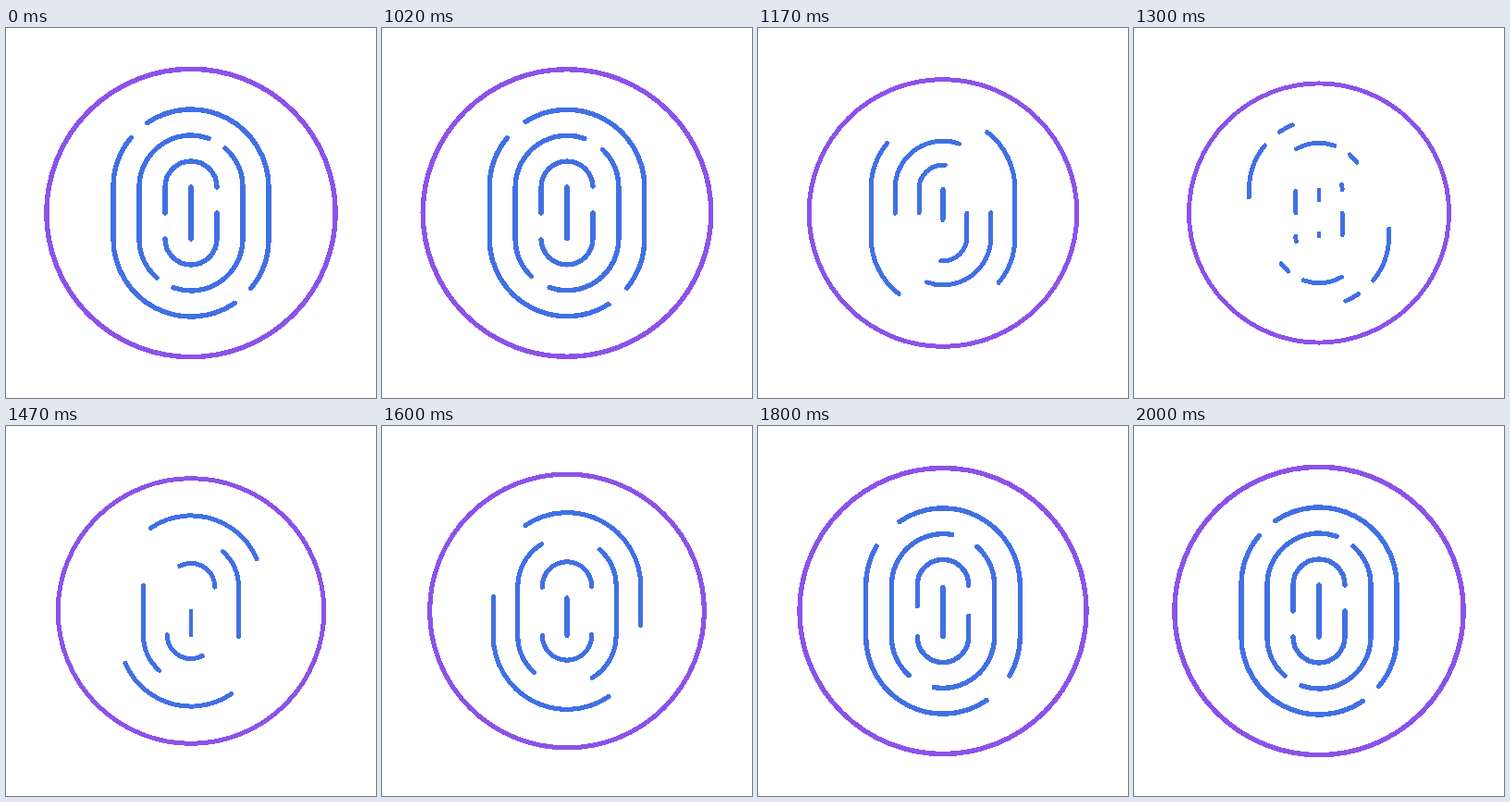
Write an HTML page that moves like this. It is 400 px wide and 400 px high and loops after 2.02 s.

```html
<!DOCTYPE html>
<html lang="en">
<head>
<meta charset="utf-8">
<title>Fingerprint</title>
<style>
  html, body { margin: 0; width: 100%; height: 100%; overflow: hidden; background: #fff; }
  svg { display: block; width: 100%; height: 100%; }
</style>
</head>
<body>
<svg viewBox="0 0 400 400" fill="none" stroke-width="5.4" stroke-linecap="round" shape-rendering="crispEdges">
  <g id="icon">
    <ellipse cx="200" cy="200" rx="156.2" ry="155.7" stroke="#8c52e8"/>
    <g id="ridges" stroke="#4170e4"/>
  </g>
</svg>
<script>
const LOOP = 2020, START = 1000, SPAN = 1000;
const TOP = 172, BOTTOM = 228;
const icon = document.getElementById('icon');
const ridges = document.getElementById('ridges');

// Point on a circle centred on the vertical axis, angle in degrees.
function polar(cy, r, angle) {
  const a = angle * Math.PI / 180;
  return `${200 + r * Math.cos(a)} ${cy + r * Math.sin(a)}`;
}

// Left side of a capsule, from its upper arc down to its lower arc.
function leftRidge(r, from, to) {
  const arc = `A${r} ${r} 0 0 0 `;
  return `M${polar(TOP, r, from)} ${arc}${200 - r} ${TOP} V${BOTTOM} ${arc}${polar(BOTTOM, r, to)}`;
}

function addPath(d, turn) {
  const path = document.createElementNS('http://www.w3.org/2000/svg', 'path');
  path.setAttribute('d', d);
  path.setAttribute('pathLength', 1);
  path.setAttribute('transform', `rotate(${turn} 200 200)`);
  return ridges.appendChild(path);
}

const shapes = [
  leftRidge(84, 219.4, 55.7),
  leftRidge(56, -70.3, 131.4),
  `M172 200 V${TOP} A28 28 0 0 1 228 ${TOP}`
].flatMap(d => [[d, 0], [d, 180]]);
shapes.push([`M200 ${TOP} V${BOTTOM}`, 0]);

const strokes = shapes.map(([d, turn]) => ({
  leaving: addPath(d, turn),
  arriving: addPath(d, turn)
}));

// Bezier easing with control points (1/3, 0) and (x2, 1).
function ease(x, x2 = 2 / 3) {
  if (x <= 0) return 0;
  if (x >= 1) return 1;
  let lo = 0, hi = 1;
  for (let i = 0; i < 30; i++) {
    const s = (lo + hi) / 2, q = 1 - s;
    if (q * q * s + 3 * q * s * s * x2 + s * s * s < x) lo = s; else hi = s;
  }
  return lo * lo * (3 - 2 * lo);
}

const between = (u, a, b) => (u - a) / (b - a);

function setDash(path, length, offset) {
  path.setAttribute('visibility', length > 0 ? 'visible' : 'hidden');
  path.setAttribute('stroke-dasharray', `${length} 2`);
  path.setAttribute('stroke-dashoffset', -offset);
}

// The motion advances in 25 ms steps, shown for 20 and 30 ms in turn.
function stepTime(t) {
  const pair = Math.floor(t / 50) * 50;
  return t - pair >= 20 ? pair + 25 : pair;
}

function render(ms) {
  const u = Math.min(1, Math.max(0, (stepTime(ms % LOOP) - START) / SPAN));
  const shrink = ease(between(u, 0, 8 / 30));
  const grow = ease(between(u, 0.3, 0.9));
  const scale = 1 - 0.1 * (shrink - grow);
  const left = 1 - ease(between(u, 0, 13 / 30));
  const drawn = ease(between(u, 0.2, 1), 0.25);

  icon.setAttribute('transform', `translate(200 200) scale(${scale}) translate(-200 -200)`);
  for (const { leaving, arriving } of strokes) {
    setDash(leaving, left, 0);
    setDash(arriving, drawn, 1 - drawn);
  }
}

const origin = performance.now();
function tick() {
  render(performance.now() - origin);
  requestAnimationFrame(tick);
}
tick();
</script>
</body>
</html>
```
